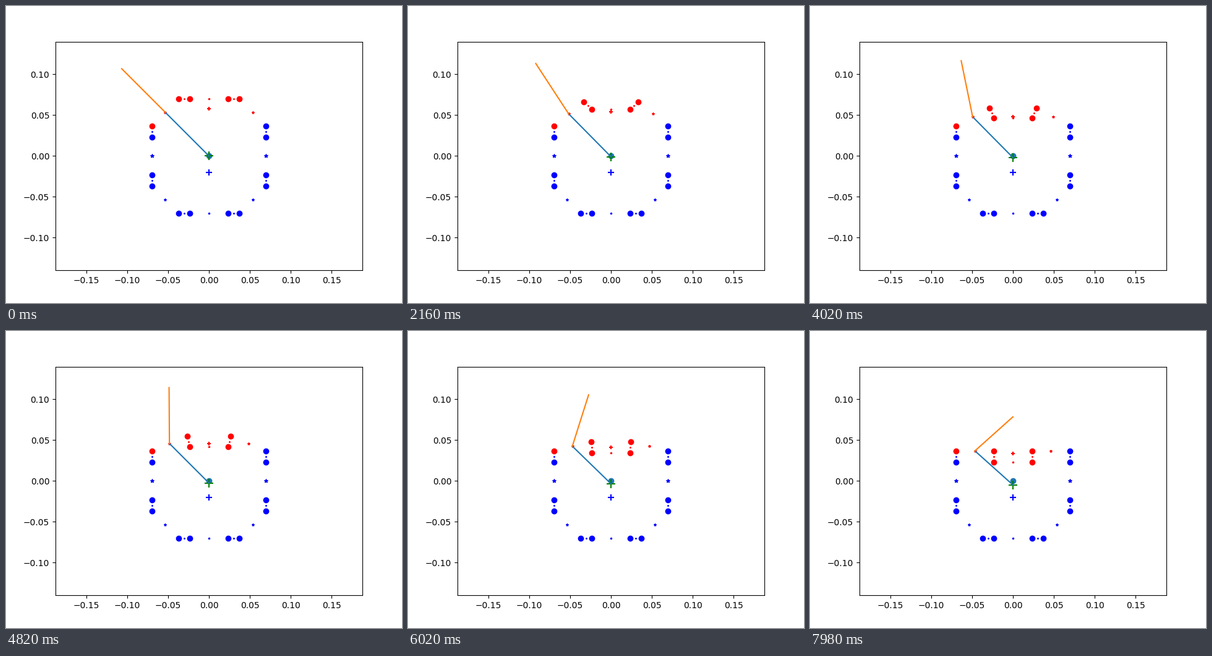
These frames come from a looping animation (640x480 px, 8000 ms). A matplotlib script:

```python
import numpy as np
import matplotlib.pyplot as plt
from matplotlib.animation import FuncAnimation

FRAMES = 400
INTERVAL = 20

# Ring geometry: half side, half link, joint positions along a side
SIDE = 0.07
HALF = 0.04 * (np.sqrt(2) - 1) / (np.sqrt(2) + 1)
NEAR, FAR = 0.03 - HALF, 0.03 + HALF
ARM = np.sqrt(2) * (SIDE - FAR)
LINK = 2 * HALF
PIVOT = np.array([-SIDE, FAR])

# Masses relative to the moving part
M_SIDE, M_CORNER, M_MID, M_LINK = 0.82, 0.361, 0.15, 0.064
M_MOVING, M_FIXED, M_ALL = 1.0, 2.9, 5.0
AREA = 20


def pair(p):
    """A point and its mirror image across the vertical axis."""
    return np.array([p, (-p[0], p[1])])


def solve(frame):
    """Positions of the folding upper part for one frame."""
    s = frame / (FRAMES - 1)
    inner = np.array([-NEAR, SIDE + (NEAR - SIDE) * s])
    gap = inner - PIVOT
    dist = np.hypot(*gap)
    ex, ey = gap / dist
    along = (dist**2 + ARM**2 - LINK**2) / (2 * dist)
    off = np.sqrt(max(ARM**2 - along**2, 0))
    arm = along * np.array([ex, ey]) + off * np.array([-ey, ex])
    outer = PIVOT + arm
    corner = PIVOT + arm / 2
    link = (inner + outer) / 2
    axis = np.array([-arm[1], arm[0]]) / ARM
    com = 2 * M_CORNER * corner[1] + M_MID * inner[1] + 2 * M_LINK * link[1]
    return inner, outer, corner, link, axis, com


fig, ax = plt.subplots(figsize=(6.4, 4.8), dpi=100)
ax.set_ylim(-0.14, 0.14)
half_width = 0.14 * 496 / 369.6
ax.set_xlim(-half_width, half_width)


def dots(points, color, mass=None, marker="*"):
    x, y = np.array(points).T
    size = 36 if mass is None else AREA * mass
    return ax.scatter(x, y, s=size, c=color, marker=marker)


# Fixed lower part
joints = [(-SIDE, NEAR), (SIDE, NEAR), (SIDE, FAR)]
for d in (NEAR, FAR):
    joints += [(-SIDE, -d), (SIDE, -d), (-d, -SIDE), (d, -SIDE)]
mid = (SIDE + FAR) / 2
dots([(0, 0)], "tab:blue", marker="o")
dots(joints, "blue", marker="o")
dots([PIVOT], "red", marker="o")
dots(pair((-SIDE, 0)), "blue", M_SIDE)
dots(pair((-mid, -mid)), "blue", M_CORNER)
dots([(0, -SIDE)], "blue", M_MID)
for p in ((-SIDE, 0.03), (-SIDE, -0.03), (-0.03, -SIDE)):
    dots(pair(p), "blue", M_LINK)
dots([(0, -0.02)], "blue", M_FIXED, "+")

# Moving upper part
origin = [(0, 0)]
inner_dots = dots(origin, "red", marker="o")
outer_dots = dots(origin, "red", marker="o")
corner_dots = dots(origin, "red", M_CORNER)
mid_dot = dots(origin, "red", M_MID)
link_dots = dots(origin, "red", M_LINK)
com_red = dots(origin, "red", M_MOVING, "+")
com_all = dots(origin, "green", M_ALL, "+")
ray_in, = ax.plot([], [], color="tab:blue")
ray_out, = ax.plot([], [], color="tab:orange")

COM_START = solve(0)[-1]


def update(frame):
    inner, outer, corner, link, axis, com = solve(frame)
    center = np.array([0, (com - COM_START) * M_MOVING / M_ALL])
    inner_dots.set_offsets(pair(inner))
    outer_dots.set_offsets(pair(outer))
    corner_dots.set_offsets(pair(corner))
    link_dots.set_offsets(pair(link))
    mid_dot.set_offsets([(0, inner[1])])
    com_red.set_offsets([(0, com)])
    com_all.set_offsets([center])
    ray = corner - center
    tip = corner + 2 * (ray @ axis) * axis - ray
    ray_in.set_data(*np.array([center, corner]).T)
    ray_out.set_data(*np.array([corner, tip]).T)
    return (inner_dots, outer_dots, corner_dots, link_dots, mid_dot,
            com_red, com_all, ray_in, ray_out)


anim = FuncAnimation(fig, update, frames=FRAMES, interval=INTERVAL,
                     repeat=True, repeat_delay=0)
plt.show()
```
